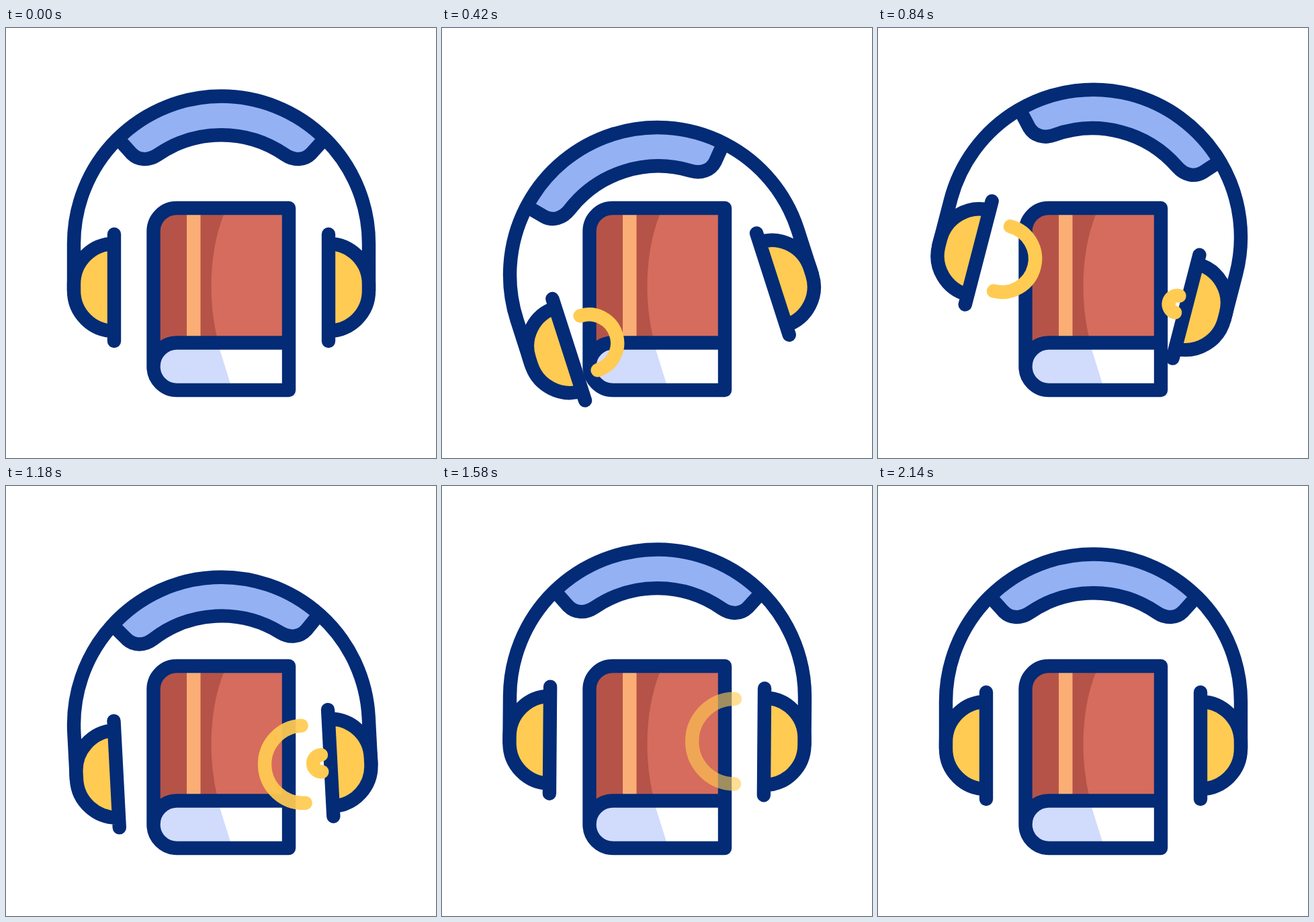
An HTML page that plays this animation: 640x640 px, repeating every 2400 ms.

```html
<!DOCTYPE html>
<html lang="en">
<head>
<meta charset="utf-8">
<title>Audiobook</title>
<style>
  html, body { margin: 0; width: 100%; height: 100%; overflow: hidden; background: #fff; }
  svg { display: block; width: 100%; height: 100%; }
  .line { fill: none; stroke: #032b76; stroke-width: 20.4; stroke-linecap: round; stroke-linejoin: round; }
  .wave { fill: none; stroke: #ffcb52; stroke-width: 20.4; stroke-linecap: round; }
</style>
</head>
<body>
<svg viewBox="0 0 640 640">
  <defs>
    <g id="cup">
      <path d="M161 321A60 60 0 0 0 101 381V391A60 60 0 0 0 161 451Z" fill="#ffcb52"/>
      <path class="line" d="M161 321A60 60 0 0 0 101 381V391A60 60 0 0 0 161 451M161 307V466"/>
    </g>
    <clipPath id="cover">
      <path d="M421 268H254A34.5 34.5 0 0 0 219.5 302.5V504A35 35 0 0 1 254.5 468.5H421Z"/>
    </clipPath>
  </defs>

  <g id="book">
    <g clip-path="url(#cover)">
      <path d="M210 260H430V510H210Z" fill="#d56c5d"/>
      <path d="M210 260H330L324 278C305 325 299 395 314 460L318 480V510H210Z" fill="#b55348"/>
      <path d="M269 260H289.5V480H269Z" fill="#faad74"/>
    </g>
    <path d="M421 468.5H254.5A35 35 0 0 0 254.5 539H421Z" fill="#fff"/>
    <path d="M315 468.5H254.5A35 35 0 0 0 254.5 539H337Z" fill="#d1dbfc"/>
    <path class="line" d="M421 268H254A34.5 34.5 0 0 0 219.5 302.5V504A35 35 0 0 0 254.5 539H421ZM421 468.5H254.5A35 35 0 0 0 219.5 504"/>
  </g>

  <g id="phones">
    <path d="M168 166L187 187C197 197 212 198 226 188.500A167 167 0 0 1 415 188.500C429 198 444 197 454 187L473 166A219.500 219.500 0 0 0 168 166Z" fill="#94b1f3"/>
    <path class="line" d="M168 166L187 187C197 197 212 198 226 188.500A167 167 0 0 1 415 188.500C429 198 444 197 454 187L473 166"/>
    <path class="line" d="M101 391V321A219.500 219.500 0 0 1 540 321V391"/>
    <use href="#cup"/>
    <use href="#cup" transform="translate(641) scale(-1 1)"/>
    <path class="wave"/>
    <path class="wave"/>
    <g transform="translate(641) scale(-1 1)">
      <path class="wave"/>
      <path class="wave"/>
    </g>
  </g>
</svg>
<script>
  const LOOP = 2400, STEP = 20;
  const phones = document.getElementById('phones');
  const waves = [...document.querySelectorAll('path.wave')];
  const waveStarts = [127, 489, 757, 1098];

  // Swing and bounce as [time, value] extremes, eased between them.
  const tilt = [[0, 0], [400, -18], [865, 14.8], [1350, -10], [1705, 4.6], [2140, 0]];
  const lift = [[0, 0], [360, 53], [720, -34.5], [1060, 52], [1432, -20.5], [1760, 11], [2140, 0]];

  const clamp = x => Math.max(0, Math.min(1, x));

  function valueAt(keys, t) {
    const i = keys.findIndex(key => key[0] > t);
    if (i < 0) return keys[keys.length - 1][1];
    const [t0, a] = keys[i - 1], [t1, b] = keys[i];
    const u = (t - t0) / (t1 - t0);
    return a + (b - a) * u * u * (3 - 2 * u);
  }

  // A half circle that grows away from the ear and fades out.
  function drawWave(path, age) {
    const opacity = clamp(age / 50) * clamp((600 - age) / 190);
    const r = 0.1 + 78 * Math.sin(clamp(age / 800) * 800 / 510);
    const x = 167 + 0.6 * r, y = 386.3;
    path.setAttribute('d', `M${x} ${y - r}A${r} ${r} 0 0 1 ${x} ${y + r}`);
    path.setAttribute('opacity', opacity);
  }

  function render(t) {
    phones.setAttribute('transform',
      `translate(0 ${valueAt(lift, t)}) rotate(${valueAt(tilt, t)} 320.5 321)`);
    waves.forEach((path, i) => drawWave(path, t - waveStarts[i]));
  }

  const start = performance.now();
  function tick() {
    const t = (performance.now() - start) % LOOP;
    render(Math.floor(t / STEP) * STEP);
    requestAnimationFrame(tick);
  }
  render(0);
  requestAnimationFrame(tick);
</script>
</body>
</html>
```
